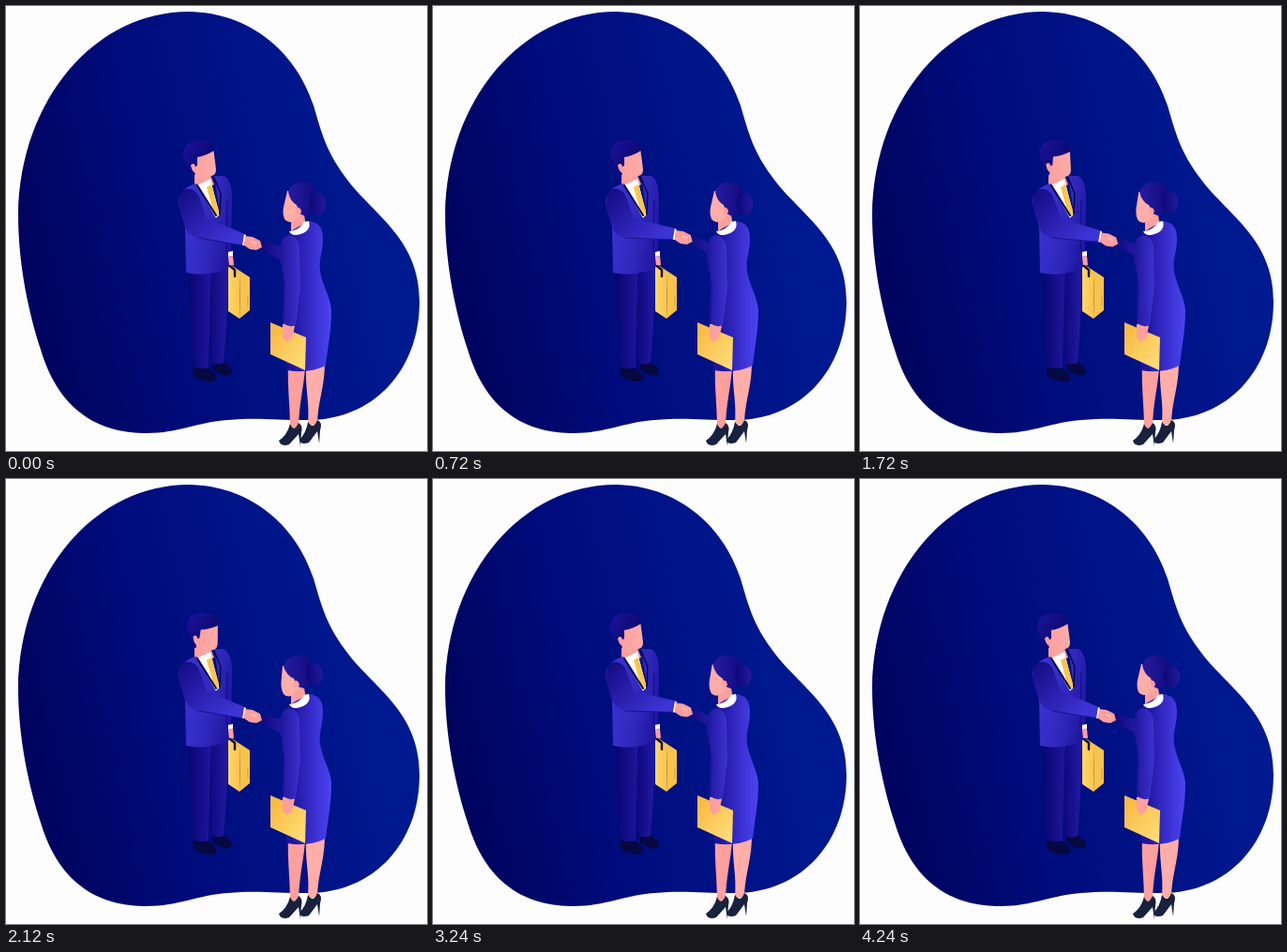
An HTML page with a canvas that plays this animation: 449x474 px, repeating every 4.28 s.

```html
<!DOCTYPE html>
<html lang="en">
<head>
<meta charset="utf-8">
<title>Handshake</title>
<style>
html, body { margin: 0; width: 100%; height: 100%; overflow: hidden; background: #fdfdfd; }
canvas { display: block; width: 449px; height: 474px; }
</style>
</head>
<body>
<canvas id="stage" width="449" height="474"></canvas>
<script>
const ctx = document.getElementById('stage').getContext('2d');
const LOOP = 4280;
const SKIN = '#fc9f9d', LIGHT_SKIN = '#ffada8', NAVY = '#060840', SHOE = '#18213d';

function grad(x0, y0, x1, y1, ...colors) {
  const g = ctx.createLinearGradient(x0, y0, x1, y1);
  colors.forEach((c, i) => g.addColorStop(i / (colors.length - 1), c));
  return g;
}

function fill(d, color) {
  ctx.fillStyle = color;
  ctx.fill(new Path2D(d));
}

function line(d, color, width) {
  ctx.strokeStyle = color;
  ctx.lineWidth = width;
  ctx.lineCap = 'round';
  ctx.stroke(new Path2D(d));
}

function turned(x, y, deg, draw) {
  ctx.save();
  ctx.translate(x, y);
  ctx.rotate(deg * Math.PI / 180);
  ctx.translate(-x, -y);
  draw();
  ctx.restore();
}

function ease(t, a, b) {
  const u = Math.min(1, Math.max(0, (t - a) / (b - a)));
  return u * u * (3 - 2 * u);
}

const mix = (a, b, u) => a + (b - a) * u;

const paint = {
  blob: grad(40, 345, 430, 255, '#00045e', '#000b7b', '#001387', '#001a92'),
  leftLeg: grad(195, 0, 218, 0, '#080670', '#1d159c'),
  rightLeg: grad(216, 0, 238, 0, '#0b0878', '#241ba8'),
  jacket: grad(190, 240, 242, 250, '#3a31d0', '#3029be', '#1e169e'),
  sleeve: grad(190, 196, 240, 250, '#140d84', '#2a20b0', '#3d34d6'),
  hair: grad(190, 145, 222, 165, '#1c129c', '#0a0868'),
  face: grad(200, 0, 224, 0, SKIN, LIGHT_SKIN),
  gold: grad(237, 0, 250, 0, '#ffd765', '#f9c34e'),
  folder: grad(282, 345, 320, 380, '#f9b940', '#ffdd78'),
  dress: grad(305, 0, 346, 0, '#1d149c', '#372cca', '#4a43f0'),
  arm: grad(293, 0, 314, 0, '#1f169c', '#3c33d2'),
  womanHair: grad(302, 200, 330, 200, '#261b9e', '#120b80'),
  bun: grad(325, 0, 342, 0, '#0d087a', '#241a9e')
};

function manBody() {
  fill('M200 384 C205 386 210 387 215 385 L224 393 C227 397 221 401 214 400 L202 396 Q198 391 200 384Z', NAVY);
  fill('M220 379 L232 379 L240 386 C244 391 237 395 231 393 L221 388Z', NAVY);
  fill('M215 278 L237 276 C236 315 235 350 232 380 Q226 383 219 380Z', paint.rightLeg);
  fill('M194 280 L219 282 C217 320 217 355 216 385 Q208 388 200 384 C198 350 195 315 194 280Z', paint.leftLeg);

  fill('M201 180 L217 178 L222 190 L209 198 L201 191Z', SKIN);
  fill('M204 191 L218 184 L228 224 L223 226Z', '#ffffff');
  fill('M214 193 L219 190 L227 218 L226 226 L221 218Z', '#f9c64c');
  fill('M203 189 C193 192 185 197 184 209 L191 235 L192 284 Q211 289 236 280 L240 263 L241 205 C241 192 238 183 232 181 L222 181 L228 222 L224 226Z', paint.jacket);
  line('M204 191 L224 223', NAVY, 2);
  line('M222 183 L229 200 L228 222', NAVY, 1.4);
  line('M236 207 L235 262', '#140d88', 1.2);
}

function briefcase() {
  fill('M237 262 L242 261 L242 266 L237 267Z', '#ffffff');
  fill('M237 267 L242 266 L243 276 L238 277Z', SKIN);
  fill('M237 278 L250 286 L249 333 L237 325Z', paint.gold);
  fill('M237 278 L240 276 L260 289 L260 324 L249 333 L250 288Z', '#f8c34b');
  line('M239 277 L244 281 L244 288', '#0b0b35', 2.4);
  line('M258 308 L258 319', '#e6a730', 1.4);
}

function manHead() {
  fill('M200 160 L221 151 L223 166 L224 174 Q224 180 219 181 L212 186 L202 183Z', paint.face);
  fill('M189 158 C189 147 198 143 207 143 C217 142 223 147 222 154 Q212 160 204 161 L204 170 L197 174 C193 170 190 165 189 158Z', paint.hair);
  fill('M197 170 C198 167 202 167 202 172 L203 178 Q199 178 197 170Z', SKIN);
}

function womanLegs() {
  fill('M301 382 L319 384 C318 405 313 420 312 449 L303 450 C303 425 300 407 301 382Z', SKIN);
  fill('M320 382 L340 379 C340 407 333 418 332 446 L322 446 C324 420 319 410 320 382Z', LIGHT_SKIN);
  fill('M303 445 Q307 455 312 444 Q317 447 315 454 L314 469 L312 456 L302 467 Q293 470 291 463 Q300 457 303 445Z', SHOE);
  fill('M322 443 Q328 452 332 441 Q338 443 335 452 L334 466 L332 453 L323 465 Q314 468 313 462 Q320 455 322 443Z', SHOE);
}

function womanBody() {
  fill('M304 219 L317 217 L320 234 Q311 243 304 239Z', SKIN);
  fill('M301 243 Q306 237 325 229 L332 232 C340 238 339 253 335 270 C332 290 346 307 347 324 C347 346 343 364 341 383 Q322 392 300 388 L295 330 L298 255Z', paint.dress);
  fill('M302 240 Q313 239 318 230 L323 229 Q326 239 314 243 Q305 246 302 240Z', '#ffffff');
}

function womanArm() {
  fill('M282 337 L320 353 L319 388 L282 371Z', paint.folder);
  fill('M295 339 Q304 336 308 341 L305 354 L299 358 L295 352Z', SKIN);
  fill('M297 246 C304 242 312 247 313 257 L314 300 L309 340 Q302 343 296 338 L298 300 L292 268 Q291 251 297 246Z', paint.arm);
}

function womanHead() {
  fill('M300 197 L297 210 Q294 220 297 227 Q301 232 307 229 L318 219 L314 197Z', LIGHT_SKIN);
  fill('M301 198 C305 187 317 185 325 190 C335 196 333 217 319 224 L313 221 L310 212 Q303 208 301 198Z', paint.womanHair);
  fill('M326 201 C334 196 342 202 341 212 C340 222 331 226 326 219 Q321 209 326 201Z', paint.bun);
  fill('M309 215 Q314 213 315 219 Q314 223 310 221Z', SKIN);
}

// The grip rises and falls; both arms follow it.
function shake(up) {
  const x = mix(255, 259, up), y = mix(250, 243.5, up);
  const wx = x + 18, wy = y + 5;
  fill(`M${wx} ${wy - 5} L296 ${mix(257, 253, up)} L296 ${mix(272, 264, up)} L${wx} ${wy + 5}Z`,
    grad(274, 0, 296, 0, '#0f0a80', '#241ba6'));
  fill(`M186 200 C191 191 204 194 207 206 L214 226 L${x} ${y - 7} L${x - 2} ${y + 5} L205 247 Q193 245 190 232 L184 213Z`, paint.sleeve);
  line(`M205 247 L${x - 2} ${y + 5}`, '#1a1290', 1);
  fill(`M${x - 1} ${y - 7} L${x + 1} ${y - 6} L${x - 1} ${y + 5} L${x - 3} ${y + 5}Z`, '#ffffff');
  fill(`M${x} ${y - 5} L${x + 8} ${y - 4} L${x + 16} ${y} L${x + 18} ${y + 7} L${x + 12} ${y + 10} L${x + 5} ${y + 9} L${x - 1} ${y + 5}Z`, SKIN);
  line(`M${x + 7} ${y + 1} L${x + 12} ${y + 3}`, '#ffc0b8', 1.5);
}

function draw(t) {
  const s = Math.sin(Math.PI * t / (LOOP / 2)) ** 2;
  const up = 1 - (1 - s) ** 2;
  const manNod = ease(t, 1360, 2040) - ease(t, 2240, 2960);
  const womanNod = ease(t, 1360, 2040) - ease(t, 2880, 3560);

  ctx.fillStyle = '#fdfdfd';
  ctx.fillRect(0, 0, 449, 474);
  fill('M195 6 C258 7 308 46 328 106 C337 137 342 155 361 181 C390 222 441 246 441 315 C441 388 392 441 322 441 C285 441 268 438 236 441 C205 443 184 455 150 455 C104 455 58 436 37 366 C24 326 13 275 13 222 C15 98 96 6 195 6Z', paint.blob);

  manBody();
  briefcase();
  turned(210, 187, 8 * manNod, manHead);
  shake(up);
  womanLegs();
  womanBody();
  womanArm();
  turned(312, 234, -8 * womanNod, womanHead);
}

const start = performance.now();
function tick(now) {
  draw(Math.max(0, now - start) % LOOP);
  requestAnimationFrame(tick);
}
draw(0);
requestAnimationFrame(tick);
</script>
</body>
</html>
```
